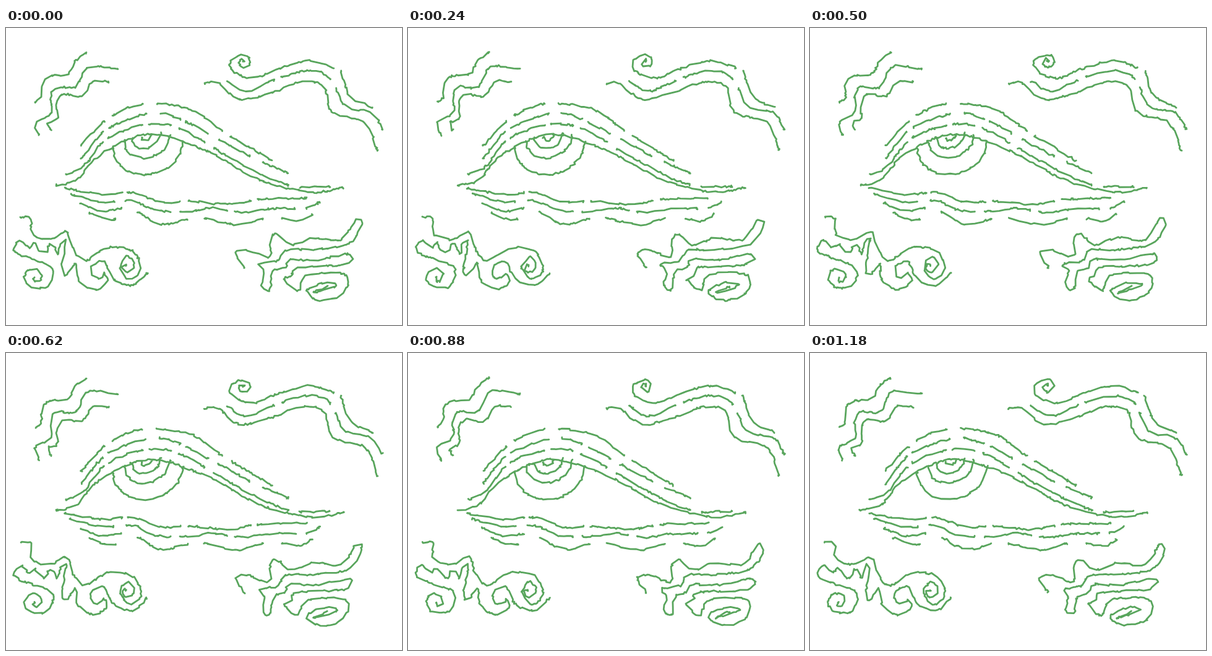
Write an HTML page with a canvas that moves like this. It is 640 px wide and 480 px high and loops after 1.2 s.

```html
<!DOCTYPE html>
<html lang="en">
<head>
<meta charset="utf-8">
<title>Sketched eye</title>
<style>
html, body { margin: 0; width: 100%; height: 100%; overflow: hidden; background: #fff; }
canvas { display: block; }
</style>
</head>
<body>
<canvas id="stage" width="640" height="480"></canvas>
<script>
const LOOP = 1200, STEP = 20, JITTER = 1.5;
const ctx = document.getElementById('stage').getContext('2d');
const strokes = [];

// Catmull-Rom curve sampled about once per pixel.
function smooth(points) {
  const samples = [];
  for (let i = 0; i < points.length - 1; i++) {
    const b = points[i], c = points[i + 1];
    const a = points[i - 1] || b, d = points[i + 2] || c;
    const count = Math.ceil(Math.hypot(c[0] - b[0], c[1] - b[1]));
    for (let k = 0; k < count; k++) {
      const t = k / count;
      samples.push([0, 1].map(n => b[n] + t / 2 * (c[n] - a[n]
        + t * (2 * a[n] - 5 * b[n] + 4 * c[n] - d[n]
        + t * (3 * (b[n] - c[n]) + d[n] - a[n])))));
    }
  }
  samples.push(points[points.length - 1]);
  return samples;
}

const parse = (text, separator) =>
  text.split(' ').map(pair => pair.split(separator).map(Number));

// Adds a curve through key points, broken where x falls inside a gap.
function curve(path, gaps = '', tail = []) {
  const holes = gaps ? parse(gaps, '-') : [];
  let dash = null;
  for (const p of smooth([...parse(path, ','), ...tail])) {
    if (holes.some(([from, to]) => p[0] > from && p[0] < to)) {
      dash = null;
    } else {
      if (!dash) strokes.push(dash = []);
      dash.push(p);
    }
  }
}

// Clockwise spiral that tightens towards its centre; angles in turns.
function spiral(cx, cy, radius, start, turns) {
  return Array.from({ length: 11 }, (_, i) => {
    const t = i / 10, angle = 2 * Math.PI * (start + turns * t);
    const r = radius * (1 - t * t);
    return [cx + r * Math.cos(angle), cy + r * Math.sin(angle)];
  });
}

// Half ellipse hanging between two points.
function bowl(x1, y1, x2, y2) {
  strokes.push(smooth(Array.from({ length: 13 }, (_, i) => {
    const angle = Math.PI * i / 12, t = (1 - Math.cos(angle)) / 2;
    return [x1 + (x2 - x1) * t,
      y1 + (y2 - y1) * t + 0.43 * (x2 - x1) * Math.sin(angle)];
  })));
}

// Eye
curve('81,254 115,245 152,205 230,172 322,198 410,245 490,265 545,258');
bowl(173, 193, 286, 183);
bowl(191, 183, 265, 173);
bowl(204, 179, 250, 170);
bowl(219, 177, 235, 173);

// Broken lines above the lid
curve('122,190 159,151 195,130 235,122 300,132 350,166 429,214', '159-172 221-243 350-363');
curve('122,211 157,168 195,149 240,137 281,147 326,170 394,207 455,234',
  '157-166 227-248 281-291 326-343 394-415');
curve('97,237 125,224 157,184 195,164 245,155 290,167 360,208 420,240 456,254',
  '157-166 221-231 266-279 322-336');
curve('475,257 523,256');

// Broken lines below the lid
curve('96,259 155,269 205,266 250,281 300,280 360,285 410,277 485,275', '189-196 283-295 395-407');
curve('104,268 155,281 205,279 243,295 300,296 335,291 380,298 430,292 485,291 507,281',
  '175-194 266-282 357-370 468-485');
curve('120,283 156,296 200,292 250,317 293,309 321,308 375,318 415,308 447,308 475,312 495,301',
  '187-213 293-321 415-447');
curve('135,299 160,309 177,309');

// Top left
curve('48,120 57,112 58,90 70,78 100,74 112,54 130,40');
curve('53,173 47,153 73,137 72,112 82,95 112,96 126,70 140,61 180,66');
curve('72,165 68,153 83,147 82,125 92,107 123,110 140,87 166,87');

// Top right
curve('592,128 556,110 541,70 529,64 490,53 440,66 400,81 368,70 363,52', '529-541',
  spiral(384, 54, 11, -0.25, 1.25));
curve('358,86 390,102 439,82 490,69 525,82 548,126 590,137 608,163', '433-445 525-533');
curve('321,90 342,89 378,115 430,104 478,87 513,94 528,136 580,153 600,198');

// Bottom left
curve('24,306 40,308 42,333 72,342 98,329 109,357 128,376 165,355 205,361 218,390 200,406 184,388', '',
  spiral(194, 384, 14, -0.25, 1));
curve('228,396 205,416 174,406 158,378 138,386 140,403 155,403 158,396 164,410 142,423 117,407 '
  + '112,380 98,399 90,390 97,343 89,345 84,365 77,351 69,351 66,363 53,360 46,347 37,355 '
  + '22,343 13,360 42,374 71,384 76,400 66,418', '', spiral(46, 403, 17, 0.25, 1.25));

// Bottom right
curve('385,387 371,364 390,359 425,370 427,342 438,333 460,351 497,339 542,342 565,309 575,316 '
  + '555,348 500,358 452,359 440,376 408,382 418,392 413,416 426,423 432,394 452,386 457,374 '
  + '500,375 557,365 548,382 470,387 462,400 450,406 472,424 487,399 548,399 545,430 507,440 '
  + '486,425 515,411 536,416 497,428 519,418');

function seededRandom(seed) {
  return () => {
    seed = seed + 0x6D2B79F5 | 0;
    let h = Math.imul(seed ^ seed >>> 15, seed | 1);
    h ^= h + Math.imul(h ^ h >>> 7, h | 61);
    return ((h ^ h >>> 14) >>> 0) / 4294967296;
  };
}

function draw(pose) {
  const random = seededRandom(pose * 7919 + 1);
  const shake = value => value + (random() * 2 - 1) * JITTER;
  ctx.fillStyle = '#fff';
  ctx.fillRect(0, 0, 640, 480);
  ctx.strokeStyle = '#58a55c';
  ctx.lineWidth = 2.8;
  ctx.lineCap = ctx.lineJoin = 'round';
  ctx.beginPath();
  for (const samples of strokes) {
    const last = samples.length - 1;
    const point = i => [shake(samples[i][0]), shake(samples[i][1])];
    ctx.moveTo(...point(0));
    ctx.lineTo(...point(0));
    // Uneven strides mix jagged stretches with straight ones.
    for (let i = 0; i < last;) {
      i = Math.min(last, i + 2 + Math.floor(14 * random() ** 4));
      ctx.lineTo(...point(i));
    }
    ctx.lineTo(...point(last));
  }
  ctx.stroke();
}

function tick() {
  draw(Math.floor(performance.now() % LOOP / STEP));
  requestAnimationFrame(tick);
}
tick();
</script>
</body>
</html>
```
